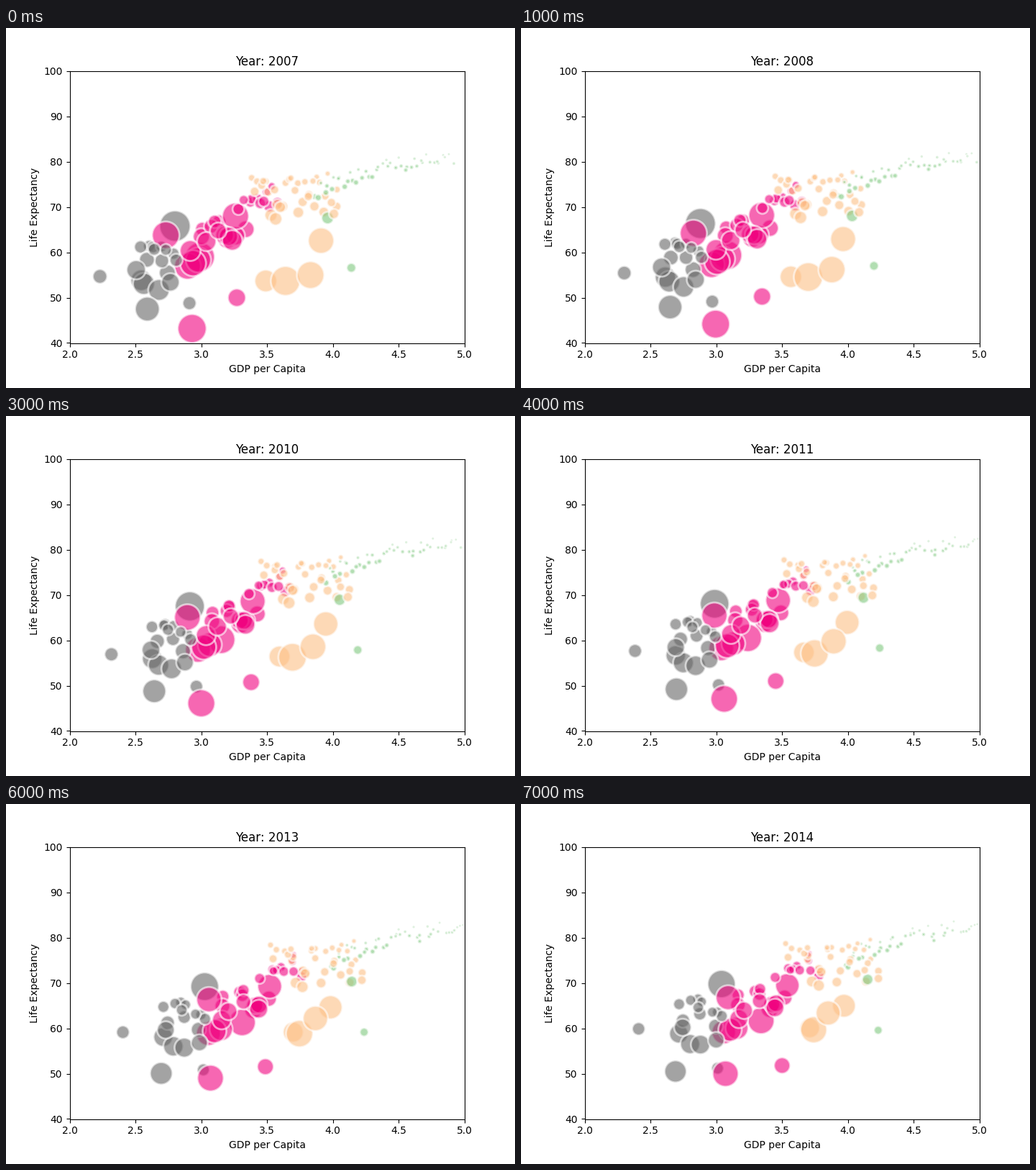
Animation, 708 px wide and 500 px high, one loop 8000 ms. Source, as a matplotlib script:

```python
import numpy as np
import matplotlib.pyplot as plt
from matplotlib.animation import FuncAnimation

W, H, DPI = 708, 500, 100
YEARS = 8
GREEN, ORANGE, PINK, GRAY = "#7fc97f", "#fdc086", "#f0027f", "#666666"

# Common boom and slump of log GDP around its steady growth.
SWING = [0, 0.045, -0.045, 0.01, 0.05, 0.045, 0.02, 0]

# Outliers: log GDP, its growth, life expectancy, its gain, radius in pixels.
OUTLIERS = {
    GRAY: [
        (2.23, 0.18, 54.7, 5.2, 10),
        (2.80, 0.24, 65.8, 4.0, 21.5),
        (2.59, 0.10, 47.5, 3.0, 17),
        (2.91, 0.10, 48.8, 2.4, 9.5),
    ],
    PINK: [
        (2.93, 0.14, 43.2, 6.8, 20),
        (3.27, 0.23, 50.0, 1.8, 12.5),
        (2.73, 0.36, 63.8, 3.0, 19),
        (2.99, 0.35, 59.0, 2.7, 20.5),
        (3.26, 0.28, 68.0, 1.5, 18.5),
    ],
    ORANGE: [
        (3.91, 0.06, 62.6, 2.4, 18),
        (3.83, 0.02, 55.0, 8.4, 19),
        (3.64, 0.10, 53.7, 6.0, 20.5),
        (3.49, 0.22, 53.7, 6.4, 15.5),
    ],
    GREEN: [
        (4.14, 0.09, 56.6, 3.0, 6.5),
        (3.96, 0.19, 67.6, 3.2, 8.5),
    ],
}

rng = np.random.default_rng(12)


def cloud(n, x0, x1, life, spread, radius, growth, gain):
    """Bubbles strewn evenly along a trend; life and radius depend on u in 0..1."""
    u = (np.arange(n) + rng.random(n)) / n
    off = rng.uniform(-1, 1, n)
    r = radius(u) * (1 - 0.35 * off)
    return np.column_stack([
        x0 + (x1 - x0) * u,
        growth * rng.uniform(0.75, 1.25, n),
        life(u) + spread * off,
        gain * rng.uniform(0.7, 1.3, n),
        r,
    ])


CLOUDS = {
    GRAY: cloud(16, 2.5, 2.82, lambda u: 56.5 + 0 * u, 5.5,
                lambda u: 13 - 3 * u, 0.21, 4),
    PINK: cloud(28, 2.88, 3.58, lambda u: 59.5 + 14 * u, 4,
                lambda u: 15 - 9 * u, 0.21, 1.8),
    ORANGE: cloud(34, 3.38, 4.05, lambda u: 71.5 + 2 * u, 5,
                  lambda u: 7.5 - 2.5 * u, 0.18, 2),
    GREEN: cloud(44, 3.85, 4.92, lambda u: 81 - 8 * (1 - u) ** 1.8, 1.8,
                 lambda u: 3.6 - 2 * u, 0.11, 1.7),
}

# One row per bubble, with the groups mixed in drawing order.
rows = np.vstack([np.vstack([OUTLIERS[c], CLOUDS[c]]) for c in CLOUDS])
colors = np.array([c for c in CLOUDS for _ in range(len(OUTLIERS[c]) + len(CLOUDS[c]))])
order = rng.permutation(len(rows))
rows, colors = rows[order], colors[order]


def bubbles(year):
    gdp, growth, life, gain, r = rows.T
    t = year / (YEARS - 1)
    points = np.column_stack([gdp + growth * t + SWING[year], life + gain * t])
    diameter = 2 * r * (1 - 0.1 * t) * 72 / DPI
    return points, diameter ** 2


fig = plt.figure(figsize=(W / DPI, H / DPI), dpi=DPI)
ax = fig.add_axes([88.58 / W, 0.125, 549.2 / W, 0.755])
ax.set_xlim(2, 5)
ax.set_ylim(40, 100)
ax.set_xlabel("GDP per Capita")
ax.set_ylabel("Life Expectancy")
title = ax.set_title("Year: 2007")

points, sizes = bubbles(0)
dots = ax.scatter(*points.T, s=sizes, c=colors,
                  alpha=0.6, edgecolors="white", linewidths=2)


def update(year):
    points, sizes = bubbles(year)
    dots.set_offsets(points)
    dots.set_sizes(sizes)
    title.set_text(f"Year: {2007 + year}")
    return dots, title


anim = FuncAnimation(fig, update, frames=YEARS, interval=1000, repeat=True)
plt.show()
```
